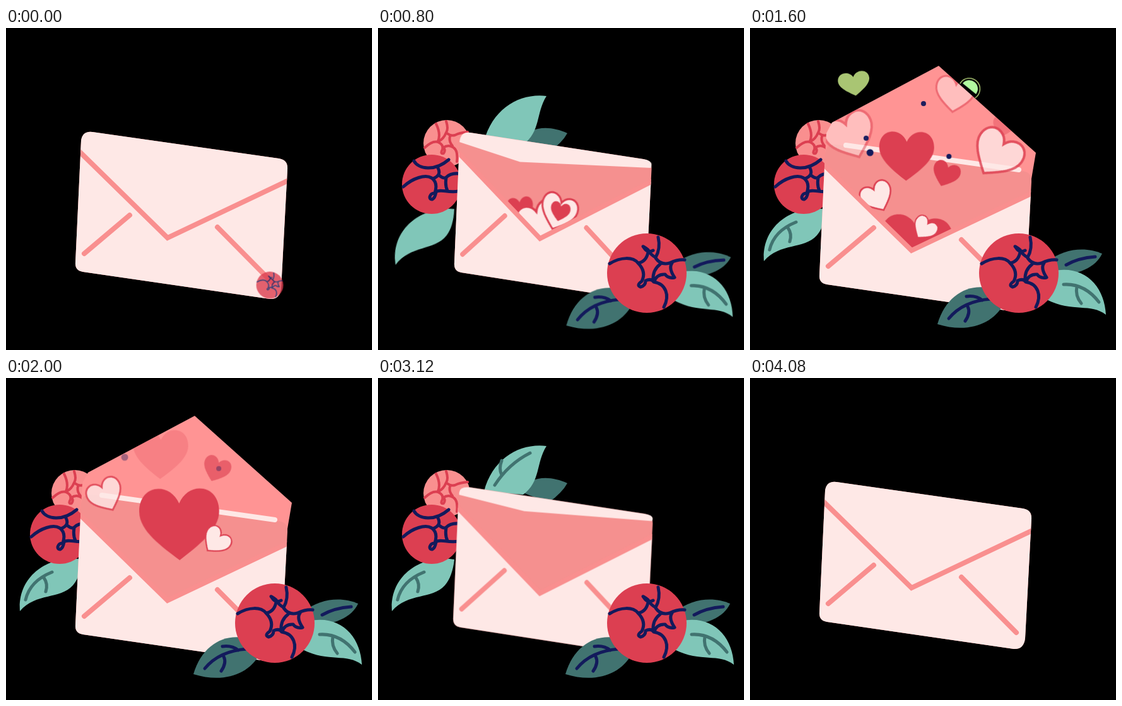
Recreate the animation shown at these times as an HTML page without scripts. Size 580 by 511 pixels, loop 4640 ms.

```html
<!DOCTYPE html>
<html lang="en">
<head>
<meta charset="utf-8">
<title>Love letter</title>
<style>
html, body { margin: 0; width: 100%; height: 100%; overflow: hidden; background: #000; }
svg { display: block; width: 580px; height: 511px; }
svg * { animation: 4640ms linear infinite; }

.white { fill: #fee8e6; }
.red { fill: #dc3f51; }
.mint { fill: #80c6b8; }
.pine { fill: #417370; }
.line { fill: none; stroke-width: 5; stroke-linecap: round; stroke-linejoin: round; }
.navy { stroke: #131a5c; }
.green { stroke: #417370; }
.rose { stroke: #dc3f51; stroke-width: 4; }
.pink { stroke: #f98f8f; stroke-width: 8; }

/* envelope */
.env { transform-origin: 266px 0; animation-name: squeeze; }
.drop { animation-name: drop; }
.back { fill: #ff9494; animation-name: back; }
.front { animation-name: front; }
.fold { stroke: #fee8e6; stroke-width: 8; animation-name: fold; }
@keyframes squeeze {
  0%, 12.5%, 25.86%, 60.34%, 72.41%, 100% { transform: scaleX(1); }
  17.24%, 66.4% { transform: scaleX(.93); }
}
@keyframes drop {
  0%, 12.5%, 72.41%, 100% { transform: translateY(0); }
  17.24% { transform: translateY(1px); }
  25.86%, 60.34% { transform: translateY(20px); }
}
@keyframes back {
  0%, 18.97%, 66.4%, 100% { d: path("M119 200L121 172L130 167L230 181L436 209L445 225Z"); }
  24.14% { d: path("M118 200L121 152L130 138L292 60L450 183L445 225Z"); }
  25.86%, 60.34% { d: path("M118 200L121 147L130 130L299 40L453 178L445 225Z"); }
}
@keyframes front {
  0%, 12.5%, 72.41%, 100% {
    d: path("M119 179Q121 163 137 165L432 207Q447 209 446 224L445 245L256 334L118 199Z"); opacity: 1;
  }
  17.24% { d: path("M119 179Q121 163 137 165L432 207Q447 209 446 217L445 221L222 212L119 180Z"); }
  18.96%, 66.41% {
    d: path("M120 172Q121 164 137 165L432 207Q447 209 446 214L445 214L225 181L120 173Z"); opacity: 1;
  }
  18.97%, 66.4% {
    d: path("M120 172Q121 164 137 165L432 207Q447 209 446 214L445 214L225 181L120 173Z"); opacity: 0;
  }
}
@keyframes fold {
  0%, 18.97%, 66.4%, 100% { opacity: 0; }
  21.5%, 63.5% { opacity: 1; }
}

/* flowers; leaves: --q tilt when folded, --k size on the way out, --w sway before rest */
.bloom { transform-origin: 426px 389px; animation-name: bloom; }
.bud { animation-name: bud; }
.leaf { animation-name: leaf; }
.front-leaf { transform-origin: 426px 389px; }
.vein { stroke-dasharray: 1 2; animation-name: vein; }
@keyframes bloom {
  0% { transform: translate(-8px, 19px) scale(.34); opacity: .8; }
  2% { opacity: 1; }
  8.62% { transform: scale(1.06); }
  12.07%, 74.14% { transform: scale(1); }
  75.86% { transform: translate(-1px, 2px) scale(.985); }
  86.21% { transform: translate(-8px, 19px) scale(.34); opacity: 1; }
  87.93%, 100% { transform: translate(-8px, 19px) scale(0); opacity: .8; }
}
@keyframes bud {
  0%, 87.93%, 100% { transform: scale(0); }
  9% { transform: scale(1.05); }
  12.07%, 77% { transform: scale(1); }
  86.21% { transform: scale(.34); }
}
@keyframes leaf {
  0%, 3.5%, 83%, 100% { transform: rotate(var(--q)) scale(0); }
  10.34% { transform: rotate(var(--w, 0deg)) scale(1.03); }
  13.79%, 17.24% { transform: rotate(var(--w, 0deg)) scale(1); }
  24.14%, 72.41% { transform: rotate(0deg) scale(1); }
  75.86% { transform: rotate(var(--q)) scale(var(--k)); }
}
@keyframes vein {
  0%, 17.5%, 82%, 100% { stroke-dashoffset: 1.1; }
  24.14%, 77% { stroke-dashoffset: 0; }
}

/* hearts: --a to --b place, --s to --e size, --r to --t tilt */
.up { opacity: 0; animation-name: rise; }
.card { fill: #fee8e6; stroke: #dc3f51; stroke-width: 5; vector-effect: non-scaling-stroke; }
.peek { animation-name: rise, peek; }
.dot { fill: #131a5c; --s: 1; --e: 1; --r: 0deg; --t: 0deg; }
.big { --a: 258px, 389px; --b: 298px, 6px; --s: 1.1; --e: 1.5; --r: 9deg; --t: -14deg; animation-delay: 1460ms; }
.flash { opacity: 0; animation-name: flash; }
@keyframes rise {
  0% { transform: translate(var(--a)) rotate(var(--r)) scale(var(--s)); opacity: 1; }
  16.8% { opacity: 1; }
  28%, 100% { transform: translate(var(--b)) rotate(var(--t)) scale(var(--e)); opacity: 0; }
}
@keyframes peek {
  0%, 25% { opacity: 1; }
  25.01%, 100% { opacity: 0; }
}
@keyframes flash {
  0%, 33.6% { opacity: 0; transform: translateY(8px); }
  33.61% { opacity: 1; }
  34.48% { transform: none; }
  36.2% { opacity: 1; }
  36.21%, 100% { opacity: 0; transform: translateY(-16px); }
}
</style>
</head>
<body>
<svg viewBox="0 0 580 511">
  <defs>
    <path id="h" d="M0 47C-22 30-50 10-50-14C-50-48-12-52 0-24C12-52 50-48 50-14C50 10 22 30 0 47Z"/>
    <path id="body" d="M119 179Q121 163 137 165L432 207Q447 209 446 224L436 413Q434 431 418 430L122 387Q109 385 110 372Z"/>
    <clipPath id="inBody"><use href="#body"/></clipPath>
    <clipPath id="open"><path d="M110 430L118 222L121 167L130 150L299 60L453 198L445 245L436 450Z"/></clipPath>
  </defs>

  <!-- left flowers -->
  <g class="leaf" style="transform-origin:225px 180px;--q:-20deg;--k:.82">
    <path class="pine" d="M225 180C240 155 272 154 300 167Q292 182 270 198Z"/>
  </g>
  <g class="leaf" style="transform-origin:180px 180px;--q:-1deg;--k:.92">
    <path class="mint" d="M168 180C182 127 225 103 267 108C250 135 258 165 230 185Z"/>
    <path class="line green vein" pathLength="1" d="M185 170Q207 136 241 119"/>
    <path class="line green vein" pathLength="1" d="M196 131Q191 144 196 154"/>
  </g>
  <g class="leaf" style="transform-origin:110px 290px;--q:4deg;--k:.91;--w:-4deg">
    <path class="mint" d="M121 288C70 280 18 312 22 370C48 340 85 352 106 329Q118 315 121 288Z"/>
    <path class="line green vein" pathLength="1" d="M31 352Q38 322 73 308"/>
    <path class="line green vein" pathLength="1" d="M60 317Q67 327 63 339"/>
  </g>
  <g class="bud" style="transform-origin:120px 185px">
    <circle cx="109" cy="183" r="37" fill="#f98f8f"/>
    <path class="line rose" d="M74 190Q88 177 97 182Q104 186 102 193Q98 200 104 199Q108 193 103 190Q112 184 120 190Q127 195 125 212M92 152Q100 168 95 180M108 148Q112 160 108 166Q115 172 122 170Q130 166 142 165M96 180Q104 176 108 166M114 172Q112 180 118 187"/>
  </g>
  <g class="bud" style="transform-origin:100px 252px">
    <circle class="red" cx="85" cy="248" r="47"/>
    <path class="line navy" d="M40 252C55 238 75 232 85 238C95 245 92 256 90 262C82 262 79 272 86 272C92 268 91 262 92 260C100 255 110 262 128 259M57 211C64 224 90 228 112 209M95 222Q101 234 87 239M97 234Q105 240 108 237Q115 230 128 231M108 238Q106 250 110 258"/>
  </g>

  <!-- envelope -->
  <g class="env">
    <use href="#h" class="up peek red big"/>
    <g class="drop">
      <path class="back" d="M118 200L121 147L130 130L299 40L453 178L445 225Z"/>
      <use href="#body" fill="#f5908f"/>
      <path class="line fold" d="M152 166L426 205"/>
    </g>
    <g clip-path="url(#open)">
      <use href="#h" class="up red" style="--a:240px,347px;--b:145px,26px;--s:.43;--e:.52;--r:-6deg;--t:-8deg;animation-delay:560ms"/>
      <use href="#h" class="up card" style="--a:284px,350px;--b:128px,126px;--s:.72;--e:.8;--r:-16deg;--t:-24deg;animation-delay:560ms"/>
      <use href="#h" class="up card" style="--a:276px,348px;--b:337px,44px;--s:.62;--e:.62;--r:24deg;--t:4deg;animation-delay:560ms"/>
      <use href="#h" class="up red" style="--a:248px,342px;--b:430px,122px;--s:.33;--e:.36;--r:16deg;--t:8deg;animation-delay:500ms"/>
      <use href="#h" class="up red" style="--a:254px,360px;--b:244px,93px;--s:.87;--e:.87;--r:1deg;--t:1deg;animation-delay:830ms"/>
      <use href="#h" class="up card" style="--a:270px,372px;--b:449px,118px;--s:.45;--e:.95;--r:28deg;--t:38deg;animation-delay:720ms"/>
      <use href="#h" class="up red" style="--a:277px,357px;--b:352px,74px;--s:.44;--e:.44;--r:20deg;--t:22deg;animation-delay:1025ms"/>
      <use href="#h" class="up card" style="--a:254px,366px;--b:112px,100px;--s:.44;--e:.62;--r:-26deg;--t:-26deg;animation-delay:1120ms"/>
      <use href="#h" class="up red big"/>
      <use href="#h" class="up card" style="--a:248px,348px;--b:432px,154px;--s:.36;--e:.54;--r:34deg;--t:50deg;animation-delay:1400ms"/>
      <circle class="up dot" r="4" style="--a:262px,345px;--b:283px,-20px;animation-delay:800ms"/>
      <circle class="up dot" r="4" style="--a:245px,345px;--b:146px,69px;animation-delay:800ms"/>
      <circle class="up dot" r="5.5" style="--a:194px,324px;--b:187px,90px;animation-delay:900ms"/>
      <circle class="up dot" r="4" style="--a:277px,309px;--b:348px,114px;animation-delay:900ms"/>
    </g>
    <g class="drop">
      <path class="front white" d="M119 179Q121 163 137 165L432 207Q447 209 446 224L445 245L256 334L118 199Z"/>
      <g clip-path="url(#inBody)">
        <path class="white" d="M100 180L256 333L460 236V450H100Z"/>
        <path class="line pink" style="stroke-linejoin:miter" d="M100 180L256 333L460 236"/>
      </g>
      <path class="line pink" d="M124 358L196 297M335 316L422 404"/>
    </g>
  </g>
  <g class="flash">
    <use href="#h" fill="#a9c573" transform="translate(165 88) rotate(-8) scale(.5 .42)"/>
    <path d="M337 88A12 12 0 1 1 358 105Z" fill="#b2fba0"/>
    <path class="line" d="M333 88A17 17 0 1 1 357 111" style="stroke:#a9c573;stroke-width:1.500"/>
  </g>

  <!-- front flower -->
  <g class="leaf front-leaf" style="--q:-9deg;--k:.64;--w:2.500deg">
    <path class="pine" d="M470 372C500 347 535 348 558 358C548 380 520 392 480 394Z"/>
    <path class="line navy" d="M501 376Q520 365 547 363"/>
  </g>
  <g class="leaf front-leaf" style="--q:-17deg;--k:.74;--w:1.500deg">
    <path class="mint" d="M478 386C530 374 562 410 564 455C540 436 512 452 470 431Z"/>
    <path class="line green" d="M497 407Q530 405 553 435M518 410Q515 425 525 437"/>
  </g>
  <g class="leaf front-leaf" style="--q:18deg;--k:.55;--w:-1deg">
    <path class="pine" d="M297 470C310 425 345 405 380 413L402 438C385 470 345 485 297 470Z"/>
    <path class="line navy" d="M315 461Q338 433 382 430M343 426Q358 424 368 432M345 442Q350 452 341 465"/>
  </g>
  <g class="bloom">
    <circle class="red" cx="426" cy="389" r="63"/>
    <path class="line navy" d="M367 374C385 363 404 363 412 373C423 384 422 394 418 402Q409 408 416 411Q424 409 424 401Q433 397 437 403C456 406 463 424 453 443M412 373Q425 371 428 356M444 332Q448 350 440 364Q432 360 428 352Q417 344 421 348Q427 358 436 353M440 365Q448 377 462 373Q475 367 486 368M466 373Q460 381 470 396Q460 398 455 391Q442 390 437 403M436 400Q435 384 447 375"/>
  </g>
</svg>
</body>
</html>
```
